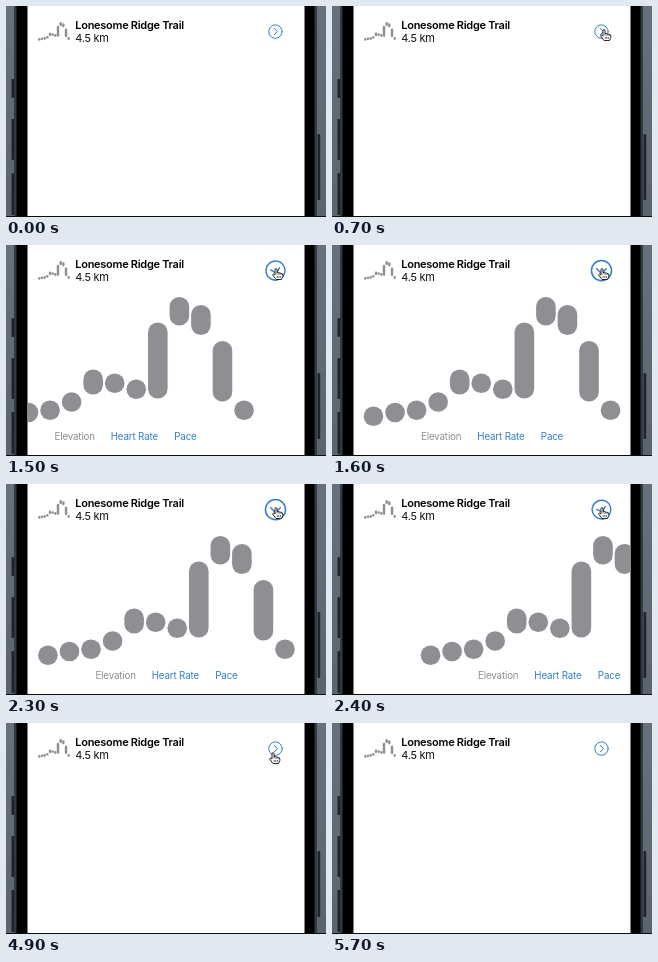
An HTML page with a canvas that plays this animation: 320 by 211 pixels, repeating every 5800 ms.

```html
<!DOCTYPE html>
<html lang="en">
<head>
<meta charset="utf-8">
<title>Trail chart</title>
<style>
  html, body { margin: 0; width: 100%; height: 100%; overflow: hidden; background: #000; }
  canvas { display: block; width: 320px; height: 211px; }
</style>
</head>
<body>
<canvas id="stage"></canvas>
<script>
const WIDTH = 320, HEIGHT = 211, LOOP = 5800, STEP = 100;
const SCREEN = { left: 21.5, right: 298.5, bottom: 210 };
const GRAY = '#8e8e93', BLUE = '#327ccb';
const SLIDE = 350, SHOW_AT = 1243, HIDE_AT = 2290;

// Top and bottom of each capsule, evenly spaced from left to right.
const capsules = [
  [161.5, 181], [157.7, 177.3], [155.5, 175], [147.2, 166.8],
  [124.5, 149.5], [128.5, 148], [134.5, 154], [77.5, 153.5],
  [52, 80.5], [60, 90], [96, 156.5], [155.5, 175]
];
const CAPSULE_WIDTH = 19.6, PITCH = 21.55, FIRST_X = 41.5;

// Pointer path: time, x, y.
const pointerPath = [
  [100, 4, 199], [200, 150, 100], [300, 294, 3], [500, 294, 3],
  [600, 282, 13], [700, 268, 23], [1000, 268, 23], [1100, 266, 23],
  [4800, 266, 23], [4900, 263, 29], [5000, 216, 100], [5100, 170, 167],
  [5200, 170, 167], [5600, 160, 198], [5700, 160, 211]
];

const canvas = document.getElementById('stage');
const ctx = canvas.getContext('2d');
const ratio = window.devicePixelRatio || 1;
canvas.width = WIDTH * ratio;
canvas.height = HEIGHT * ratio;

const clamp = v => Math.min(1, Math.max(0, v));

// Cubic curve with control points at x = 0.42 and 0.58.
function easeInOut(p) {
  let low = 0, high = 1;
  for (let i = 0; i < 24; i++) {
    const s = (low + high) / 2, r = 1 - s;
    const x = 3 * r * r * s * 0.42 + 3 * r * s * s * 0.58 + s * s * s;
    if (x < p) low = s; else high = s;
  }
  return low * low * (3 - 2 * low);
}

const progress = (t, start) => easeInOut(clamp((t - start) / SLIDE));

function rect(x, y, w, h, color) {
  ctx.fillStyle = color;
  ctx.fillRect(x, y, w, h);
}

function roundRect(x, y, w, h, radius, color) {
  ctx.fillStyle = color;
  ctx.beginPath();
  ctx.roundRect(x, y, w, h, radius);
  ctx.fill();
}

function text(label, x, y, size, color, weight = 400, spacing = -0.28) {
  ctx.font = `${weight} ${size}px Inter, sans-serif`;
  ctx.letterSpacing = `${spacing}px`;
  ctx.fillStyle = color;
  ctx.fillText(label, x, y);
}

function drawPhone() {
  const metal = ctx.createLinearGradient(0, 0, 0, HEIGHT);
  metal.addColorStop(0, '#67717d');
  metal.addColorStop(1, '#5a646f');
  rect(0, 0, WIDTH, HEIGHT, metal);
  rect(8, 0, 303, HEIGHT, '#343a41');
  rect(10.5, 0, 298, HEIGHT, '#000');
  rect(SCREEN.left, 0, SCREEN.right - SCREEN.left, SCREEN.bottom, '#fff');
  rect(0, SCREEN.bottom, WIDTH, 1, '#0c0d0f');
  for (const [x, y, h] of [[5.5, 73, 19], [5.5, 113, 41], [5.5, 167, 42], [311.5, 128, 66]])
    roundRect(x, y, 2.7, h, 1, '#20242a');
}

function drawCapsules() {
  capsules.forEach(([top, bottom], i) => {
    const x = FIRST_X + i * PITCH - CAPSULE_WIDTH / 2;
    roundRect(x, top, CAPSULE_WIDTH, bottom - top, CAPSULE_WIDTH / 2, GRAY);
  });
}

function drawHeader() {
  ctx.save();
  ctx.translate(32, 16);
  ctx.scale(0.124, 0.146);
  ctx.translate(-31, -52);
  drawCapsules();
  ctx.restore();
  text('Lonesome Ridge Trail', 69.3, 23, 11, '#000', 600);
  text('4.5 km', 69.3, 36.3, 11, '#111');
}

function drawChart(offset) {
  ctx.save();
  ctx.beginPath();
  ctx.rect(SCREEN.left, 0, SCREEN.right - SCREEN.left, SCREEN.bottom);
  ctx.clip();
  ctx.translate(offset, 0);
  drawCapsules();
  text('Elevation', 89, 195.3, 9.75, GRAY, 400, -0.15);
  text('Heart Rate', 145.3, 195.3, 9.75, BLUE, 400, -0.15);
  text('Pace', 208.8, 195.3, 9.75, BLUE, 400, -0.15);
  ctx.restore();
}

function drawButton(open) {
  ctx.save();
  ctx.translate(269.5, 25.6);
  ctx.rotate(open * Math.PI / 2);
  ctx.scale(1 + open / 2, 1 + open / 2);
  ctx.strokeStyle = BLUE;
  ctx.lineWidth = 1;
  ctx.lineCap = ctx.lineJoin = 'round';
  ctx.beginPath();
  ctx.arc(0, 0, 6.7, 0, Math.PI * 2);
  ctx.moveTo(-1.2, -3.2);
  ctx.lineTo(1.9, 0);
  ctx.lineTo(-1.2, 3.2);
  ctx.stroke();
  ctx.restore();
}

function drawPointer(t) {
  const next = pointerPath.findIndex(key => key[0] > t);
  if (next < 1) return;
  const [t0, x0, y0] = pointerPath[next - 1];
  const [t1, x1, y1] = pointerPath[next];
  const p = (t - t0) / (t1 - t0);
  ctx.save();
  ctx.translate(x0 + (x1 - x0) * p, y0 + (y1 - y0) * p);
  const hand = new Path2D(
    'M3 7V1.8Q3 .6 4 .6T5 1.8V4.6Q6.3 4 7 5Q8.4 4.6 9 5.6' +
    'Q10.8 5.2 10.8 7V8.5L9.5 11.5H4L1 7.6Q.2 6.4 1.3 6Z');
  ctx.fillStyle = '#fff';
  ctx.strokeStyle = '#111';
  ctx.lineWidth = 0.9;
  ctx.lineJoin = 'round';
  ctx.fill(hand);
  ctx.stroke(hand);
  ctx.lineWidth = 0.6;
  ctx.stroke(new Path2D('M5 4.6V6.6M7 5V6.8M9 5.6V7M5.2 8V10M6.8 8V10M8.4 8V10'));
  ctx.restore();
}

function draw(t) {
  ctx.setTransform(ratio, 0, 0, ratio, 0, 0);
  drawPhone();
  drawHeader();
  const shown = progress(t, SHOW_AT), hidden = progress(t, HIDE_AT);
  if (shown > 0 && hidden < 1 && t < HIDE_AT + SLIDE)
    drawChart((shown - 1 + hidden) * (SCREEN.right - SCREEN.left));
  drawButton(shown - hidden);
  drawPointer(t);
}

const start = performance.now();
function tick() {
  const elapsed = (performance.now() - start) % LOOP;
  draw(Math.floor(elapsed / STEP) * STEP);
  requestAnimationFrame(tick);
}
tick();
</script>
</body>
</html>
```
